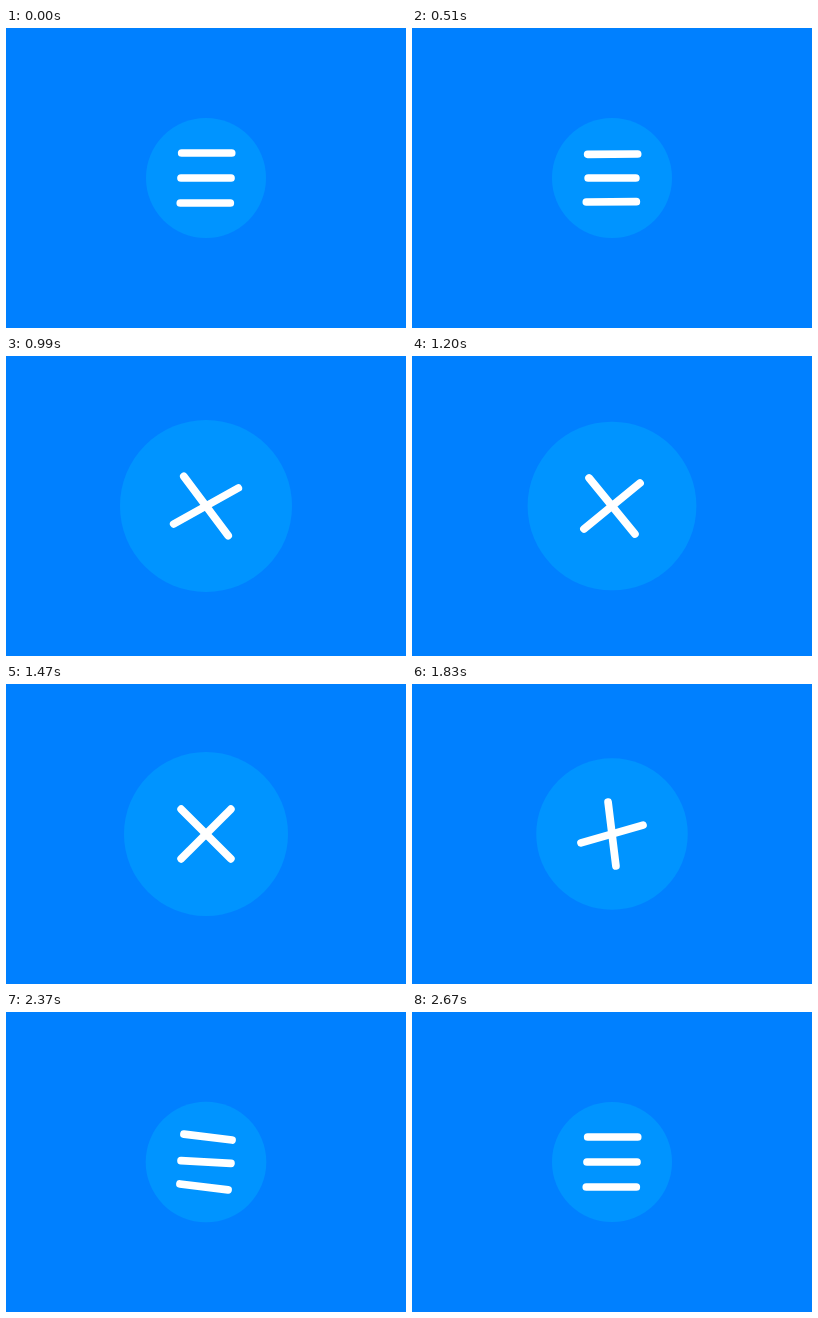
Animation of 400 by 300 pixels, one loop 2700 ms. Source, as an HTML page:

```html
<!DOCTYPE html>
<html>
<head>
<meta charset="utf-8">
<style>
  html, body { margin: 0; width: 100%; height: 100%; overflow: hidden; background: #0080ff; }
  svg { display: block; width: 100vw; height: 100vh; }
  line { stroke: #fff; stroke-width: 7.7; stroke-linecap: round; }
</style>
</head>
<body>
<svg viewBox="-200 -150 400 300">
  <circle fill="#0094ff"/>
  <line/><line/><line/>
</svg>
<script>
const LOOP = 2700;
const RAD = Math.PI / 180;

const circle = document.querySelector('circle');
const [upper, middle, lower] = document.querySelectorAll('line');

// Progress from 0 to 1 between two times, with different easings.
const ramp = (t, from, to) => Math.min(1, Math.max(0, (t - from) / (to - from)));
const easeIn = (t, from, to, power) => ramp(t, from, to) ** power;
const easeOut = (t, from, to, power) => 1 - (1 - ramp(t, from, to)) ** power;
const smooth = (t, from, to) => {
  const u = ramp(t, from, to);
  return u * u * (3 - 2 * u);
};
// Rises to 1 at the peak and falls back to 0.
const swing = (t, from, peak, to) => smooth(t, from, peak) - smooth(t, peak, to);

function setBar(bar, x, y, angle, length) {
  const dx = Math.cos(angle * RAD) * length / 2;
  const dy = Math.sin(angle * RAD) * length / 2;
  bar.setAttribute('x1', x - dx);
  bar.setAttribute('y1', y - dy);
  bar.setAttribute('x2', x + dx);
  bar.setAttribute('y2', y + dy);
}

function draw(t) {
  // The disc bursts open, relaxes, then closes.
  const radius = 60 + 26 * easeIn(t, 480, 990, 4) - 4 * smooth(t, 990, 1470)
    - 21.3 * easeIn(t, 1470, 2085, 2.3) - 0.7 * smooth(t, 2085, 2600);

  // Half the angle between the crossed bars.
  const spread = 45 * easeOut(t, 680, 1120, 2) + 4.5 * smooth(t, 1470, 1830)
    - 49.5 * easeIn(t, 1830, 2095, 1.5);

  // Both outer bars wobble together.
  const tilt = -12.7 * swing(t, 480, 780, 990) + 12 * swing(t, 780, 990, 1400)
    + 33.5 * smooth(t, 1470, 1830) - 7.5 * smooth(t, 1830, 2160)
    - 26 * easeOut(t, 2160, 2600, 2);
  const sway = 7 * swing(t, 1900, 2090, 2600);

  // The stack collapses into the centre and springs apart again.
  const stack = 1 - easeIn(t, 480, 720, 1.5) + easeOut(t, 2080, 2320, 3);
  const length = 50 + 0.92 * (radius - 60) - 5.5 * swing(t, 1830, 2160, 2500);

  const axis = (sway + 1.6) * RAD;
  const x = 25 * stack * Math.sin(axis);
  const y = -25 * stack * Math.cos(axis);
  circle.setAttribute('r', radius);
  setBar(upper, x, y, tilt + spread, length);
  setBar(middle, 0, 0, sway, 50 * stack);
  setBar(lower, -x, -y, tilt - spread, length);
}

const start = performance.now();
function frame() {
  draw((performance.now() - start) % LOOP);
  requestAnimationFrame(frame);
}
frame();
</script>
</body>
</html>
```
